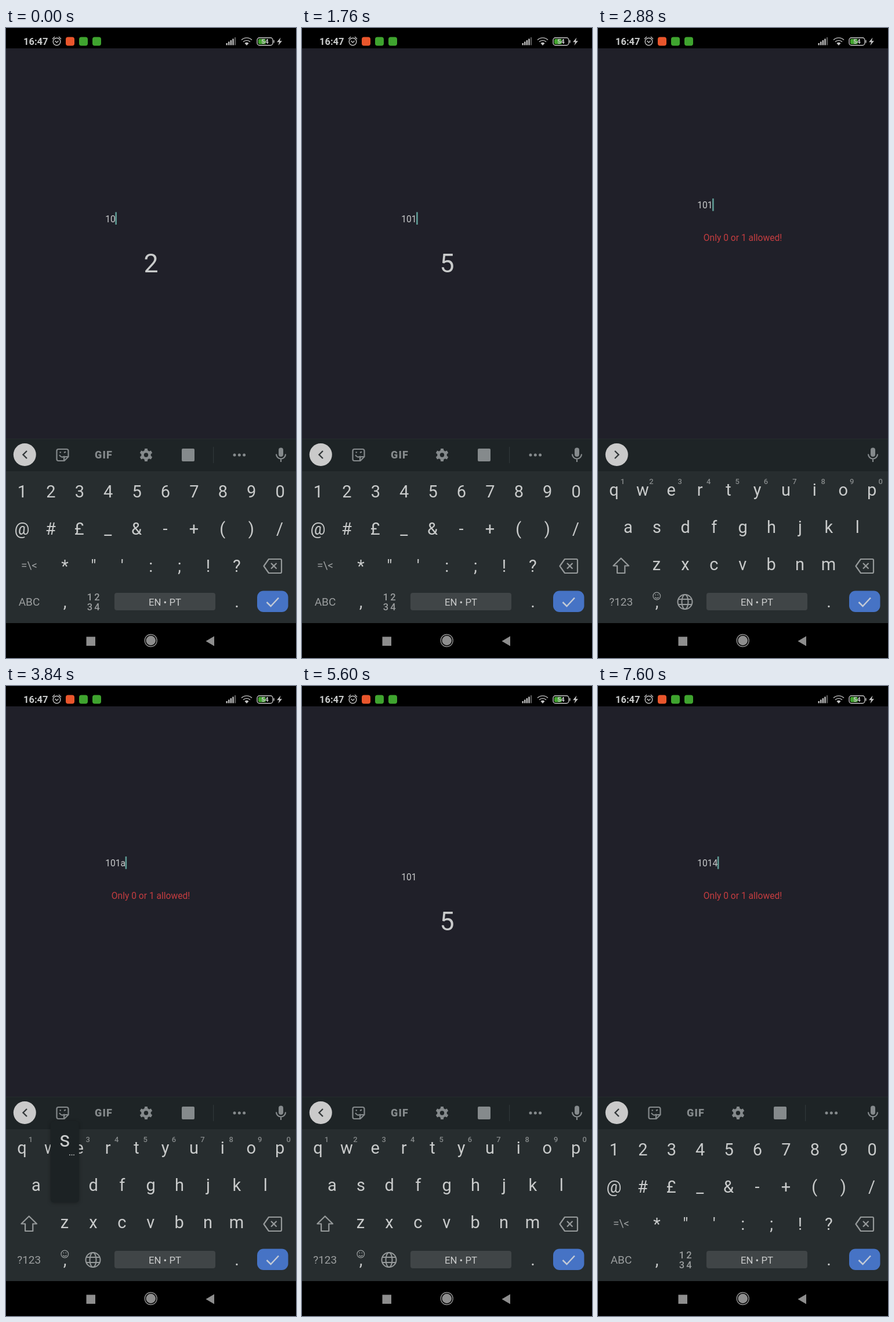
Animation of 500 by 1083 pixels, one loop 8000 ms. Source, as an HTML page:

```html
<!DOCTYPE html>
<html lang="en">
<head>
<meta charset="utf-8">
<title>Binary converter</title>
<style>
  html, body { margin: 0; width: 100%; height: 100%; overflow: hidden; background: #000; }
  svg { display: block; width: 100%; height: 100%; }
  text { font-family: Roboto, sans-serif; fill: #c9cbcb; white-space: pre; }
  .mid { text-anchor: middle; }
  .key { font-size: 29px; }
  .label { font-size: 19px; fill: #9b9e9f; }
  .hint { font-size: 13px; font-weight: 500; fill: #85898a; }
  .line { fill: none; stroke: #969a9b; stroke-width: 2.2; stroke-linejoin: round; }
  .icon { fill: #858a8c; }
  .thin { fill: none; stroke: #c4c4c4; stroke-width: 1.4; }
  .field { font-size: 15.6px; }
  #popup rect { filter: drop-shadow(0 1px 3px rgba(0, 0, 0, .3)); }
</style>
</head>
<body>
<svg viewBox="0 0 500 1083">
  <rect width="500" height="1083"/>
  <rect y="35" width="500" height="672" fill="#202029"/>

  <g id="status">
    <text x="30" y="29" font-size="16.5" font-weight="700">16:47</text>
    <g class="thin">
      <circle cx="87.5" cy="23.5" r="6.3"/>
      <path d="M80 19l4-4M95 19l-4-4M84.5 22l3 3 3-3"/>
    </g>
    <rect x="103" y="15.5" width="15" height="15" rx="4" fill="#e9562c"/>
    <rect x="126" y="15.5" width="15" height="15" rx="4" fill="#3fa42f"/>
    <rect x="149" y="15.5" width="15" height="15" rx="4" fill="#3fa42f"/>
    <g id="signal"></g>
    <g class="thin" stroke-width="2">
      <path d="M406 20.5a13 13 0 0 1 18 0M409 23.8a8.6 8.6 0 0 1 12 0"/>
    </g>
    <path d="M411.5 26.3a5 5 0 0 1 7 0L415 30z" fill="#c4c4c4"/>
    <rect x="433" y="16.7" width="27" height="13" rx="4" class="thin"/>
    <path d="M437 18.7h10.5v9H437a2 2 0 0 1-2-2v-5a2 2 0 0 1 2-2z" fill="#43a52f"/>
    <path d="M462 21v4.5" class="thin"/>
    <text x="446.5" y="27.2" class="mid" font-size="11" font-weight="700">54</text>
    <path d="M473.5 16.5l-6.5 7.7h4l-1.6 5.8 6.6-7.8h-4z" fill="#c4c4c4"/>
  </g>

  <g id="app">
    <text id="field" class="field" x="171.2"></text>
    <rect id="cursor" width="2.6" height="21.5" fill="#5f9c95"/>
    <text id="error" class="mid field" x="249.6" y="365.6" style="fill:#c53d40">Only 0 or 1 allowed!</text>
    <text id="result" class="mid" x="250" y="420" font-size="44.6"></text>
  </g>

  <rect y="706" width="500" height="56" fill="#1e2426"/>
  <rect y="706" width="500" height="1" fill="#252b2d"/>
  <rect y="762" width="500" height="261" fill="#272d2f"/>

  <circle cx="32.3" cy="733.5" r="19.5" fill="#cacaca"/>
  <path id="chevron" fill="none" stroke="#33383a" stroke-width="2.4"/>
  <g id="tools" class="icon">
    <g class="line" style="stroke:#858a8c">
      <path d="M90.5 724h14a3 3 0 0 1 3 3v10l-7 7h-10a3 3 0 0 1-3-3v-14a3 3 0 0 1 3-3zM107 737h-4a3 3 0 0 0-3 3v4"/>
      <path d="M92 734q4 6 9 2M92.5 729.5h2.5M100 730l3-1.5"/>
    </g>
    <text x="153" y="740" font-size="18" font-weight="900" letter-spacing="1.2" style="fill:#858a8c">GIF</text>
    <g id="gear" transform="translate(241.5 734)"></g>
    <rect x="303" y="723" width="22" height="22" rx="2"/>
    <rect x="357" y="720" width="1.2" height="28" fill="#30373a"/>
    <circle cx="394" cy="734" r="2.5"/><circle cx="402.3" cy="734" r="2.5"/><circle cx="410.6" cy="734" r="2.5"/>
  </g>
  <rect x="470" y="721.5" width="8" height="15.5" rx="4" class="icon"/>
  <path d="M466 732.5a8 8 0 0 0 16 0M474 741v5" class="line" style="stroke:#858a8c"/>

  <rect id="press" rx="8" height="44" fill="#343a3c"/>

  <g id="digits">
    <text class="mid label" x="40" y="930">=\&lt;</text>
    <text class="mid label" x="40" y="993">ABC</text>
    <text class="mid key" x="101.5" y="996" font-size="24">,</text>
    <g class="mid" font-size="16.5" font-weight="500" id="numpad"></g>
  </g>
  <g id="letters">
    <path class="line" d="M39.7 911.5L53 924.5h-6.7V937h-13.200V924.500h-6.700z"/>
    <text class="mid label" x="39.700" y="993">?123</text>
    <g class="line" stroke-width="1.300" style="stroke-width:1.300">
      <circle cx="101.300" cy="976.500" r="6.300"/>
      <path d="M98 978.500q3.300 3.500 6.600 0M98.500 974.500h1.500M102.600 974.500h1.500"/>
    </g>
    <text class="mid key" x="101.500" y="996">,</text>
    <g class="line" style="stroke-width:2">
      <circle cx="150" cy="986.500" r="12.500"/>
      <ellipse cx="150" cy="986.500" rx="5.500" ry="12.500"/>
      <path d="M138.500 982h23M138.500 991h23"/>
    </g>
  </g>

  <path class="line" d="M444.500 925l8.500-12h20a2 2 0 0 1 2 2v20a2 2 0 0 1-2 2h-20zM457 920l9.500 9.500M466.500 920l-9.500 9.500"/>
  <rect x="187" y="971" width="174" height="30" rx="4" fill="#404547"/>
  <text class="mid" x="274" y="992.500" font-size="16.800">EN • PT</text>
  <text class="mid key" x="398" y="996">.</text>
  <rect x="433" y="967.500" width="53.500" height="36.500" rx="11" fill="#4673c5"/>
  <path d="M449.500 987l7 7 13.500-14.500" fill="none" stroke="#c3cad6" stroke-width="2.500"/>

  <g id="popup">
    <rect x="-24.500" y="-110" width="49" height="140" rx="6" fill="#1c2224"/>
    <text id="popupChar" class="mid" y="-66" font-size="36"></text>
    <text class="mid" x="12" y="-51" font-size="17">…</text>
  </g>

  <g fill="#8e8e8e">
    <rect x="138.500" y="1046.500" width="15.500" height="15.500"/>
    <circle cx="249.700" cy="1053" r="8.300"/>
    <circle cx="249.700" cy="1053" r="10.500" fill="none" stroke="#8e8e8e" stroke-width="1.400"/>
    <path d="M344.500 1054l14.500-8.500v17z"/>
  </g>
</svg>
<script>
const LOOP = 8000, STEP = 49.4;
const $ = id => document.getElementById(id);

function add(parent, tag, attrs, text = '') {
  const node = document.createElementNS('http://www.w3.org/2000/svg', tag);
  for (const name in attrs) node.setAttribute(name, attrs[name]);
  node.textContent = text;
  $(parent).append(node);
}

function keyRow(parent, chars, x, y) {
  [...chars].forEach((c, i) => add(parent, 'text', { class: 'mid key', x: x + i * STEP, y }, c));
}

keyRow('digits', '1234567890', 28, 807);
keyRow('digits', '@#£_&-+()/', 27.5, 871);
keyRow('digits', '*"\':;!?', 101.5, 935);
keyRow('letters', 'qwertyuiop', 27.5, 804);
keyRow('letters', 'asdfghjkl', 52, 868);
keyRow('letters', 'zxcvbnm', 101, 932);
[...'1234567890'].forEach((c, i) =>
  add('letters', 'text', { class: 'mid hint', x: 42.5 + i * STEP, y: 783.5 }, c));
[...'1234'].forEach((c, i) =>
  add('numpad', 'text', { class: 'mid', x: 144.5 + i % 2 * 12.5, y: i < 2 ? 984 : 1001, style: 'fill:#9b9e9f' }, c));

for (let i = 0; i < 5; i++) {
  const height = 3.5 + i * 2.5;
  add('signal', 'rect', { x: 379.5 + i * 3.6, y: 29.5 - height, width: 2.4, height, fill: i < 4 ? '#c4c4c4' : '#555' });
}

for (let a = 0; a < 360; a += 60)
  add('gear', 'path', { d: 'M-3-7L-2.3-11h4.600L3-7z', transform: `rotate(${a})` });
add('gear', 'circle', { r: 6, fill: 'none', stroke: '#858a8c', 'stroke-width': 4.6 });

// Pressed keys: centre of the popup, or left edge, top and width of the highlight
const KEYS = { 1: [28, 797], 4: [176, 797], a: [52, 858], s: [101.4, 858] };
const PRESSES = { erase: [436, 903, 58], mode: [15, 960, 50] };

// Each entry changes only the listed parts of the state
const EVENTS = [
  [0, { text: '10', result: '2', cursor: 1, letters: 0, tools: 1, error: 0, popup: '', press: '' }],
  [520, { cursor: 0 }],
  [720, { popup: '1' }],
  [800, { popup: '', text: '101', result: '5', cursor: 1 }],
  [1320, { cursor: 0 }],
  [1760, { cursor: 1 }],
  [1880, { letters: 1, press: 'mode' }],
  [1920, { press: '', popup: 'a' }],
  [1960, { text: '101a' }],
  [2000, { error: 1 }],
  [2040, { popup: '' }],
  [2440, { cursor: 0 }],
  [2800, { press: 'erase' }],
  [2880, { press: '', text: '101', cursor: 1, tools: 0 }],
  [2920, { error: 0 }],
  [3000, { tools: 1 }],
  [3400, { cursor: 0 }],
  [3640, { popup: 'a' }],
  [3720, { text: '101a', cursor: 1 }],
  [3760, { popup: '', error: 1 }],
  [3800, { popup: 's' }],
  [3920, { text: '101as' }],
  [3960, { popup: '' }],
  [4400, { cursor: 0 }],
  [4600, { press: 'erase' }],
  [4720, { text: '101a', cursor: 1 }],
  [4840, { press: '' }],
  [5040, { press: 'erase', text: '101' }],
  [5120, { press: '', error: 0 }],
  [5560, { cursor: 0 }],
  [5960, { letters: 0, press: 'mode' }],
  [6080, { press: '', cursor: 1 }],
  [6480, { popup: '4' }],
  [6640, { popup: '', text: '1014' }],
  [6680, { error: 1 }],
  [7160, { cursor: 0 }],
  [7600, { cursor: 1 }]
];

const show = (id, on) => $(id).style.display = on ? '' : 'none';
const set = (id, attrs) => { for (const name in attrs) $(id).setAttribute(name, attrs[name]); };

function render(s) {
  const y = s.error ? 310.3 : 333.7;
  $('field').textContent = s.text;
  set('field', { y });
  set('cursor', { x: 171.2 + $('field').getComputedTextLength() - .4, y: y - 17.2 });
  show('cursor', s.cursor);
  show('error', s.error);
  $('result').textContent = s.error ? '' : s.result;
  show('letters', s.letters);
  show('digits', !s.letters);
  show('tools', s.tools);
  set('chevron', { d: s.tools ? 'M36 727l-6.5 6.5 6.5 6.5' : 'M29 727l6.500 6.500-6.500 6.500' });
  show('popup', s.popup);
  if (s.popup) {
    $('popupChar').textContent = s.popup;
    set('popup', { transform: `translate(${KEYS[s.popup]})` });
  }
  show('press', s.press);
  if (s.press) {
    const [x, top, width] = PRESSES[s.press];
    set('press', { x, y: top, width });
  }
}

let shown = -1;
const start = performance.now();
function frame() {
  const t = (performance.now() - start) % LOOP;
  const past = EVENTS.filter(([at]) => at <= t);
  if (past.length !== shown) {
    shown = past.length;
    render(Object.assign({}, ...past.map(e => e[1])));
  }
  requestAnimationFrame(frame);
}
frame();
</script>
</body>
</html>
```
